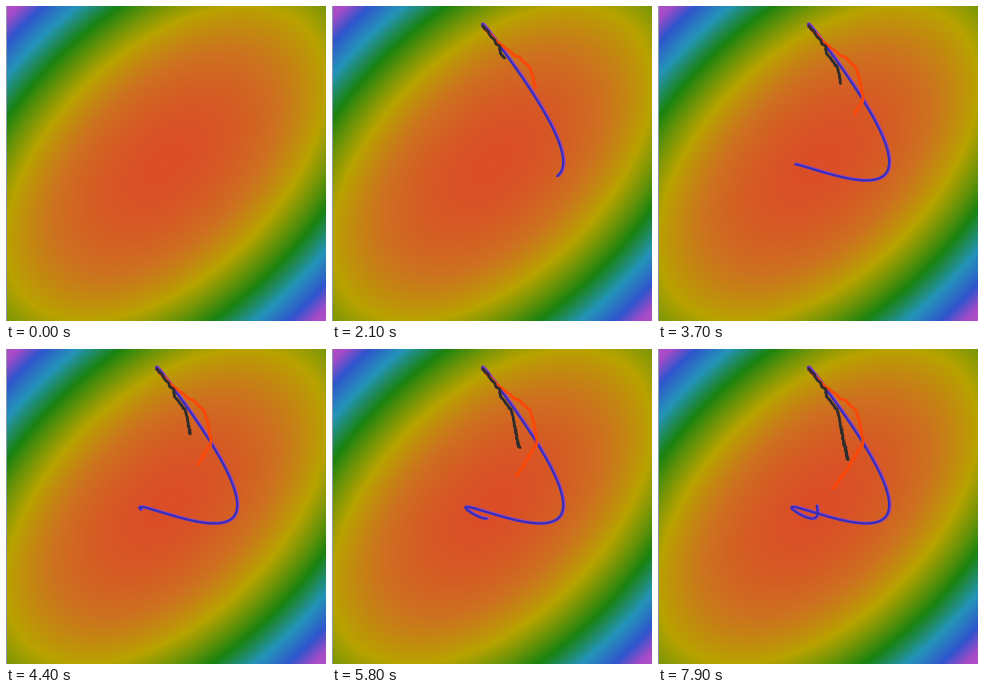
Write a matplotlib script that moves like this. It is 320 by 315 pixels and loops after 8000 ms.

```python
import numpy as np
import matplotlib.pyplot as plt
from matplotlib.animation import FuncAnimation
from matplotlib.colors import LinearSegmentedColormap

W, H, DPI = 320, 315, 100
FRAMES, STEP, SUB = 80, 100, 4
CX, CY = 160, 157

# Loss levels and their colours
STOPS = [
    (0.00, (219, 78, 40)), (0.35, (206, 112, 32)), (0.75, (184, 163, 0)),
    (1.36, (26, 131, 16)), (1.85, (36, 148, 185)), (2.35, (48, 85, 205)),
    (2.75, (165, 75, 200)), (3.00, (178, 80, 198)),
]

times = np.arange((FRAMES - 1) * SUB + 1) / SUB


def rgb(*c):
    return tuple(v / 255 for v in c)


def swing(size, phase, fade, power):
    """Oscillation whose size dies away around time `fade`."""
    return size * np.cos(np.pi * phase) / (1 + (times / fade) ** power)


def momentum():
    """Damped swings along the short (u) and long (v) axis of the bowl."""
    t = times
    slow_start = 0.2 * np.exp(-t / 5)
    u = -swing(149, -0.262 + 0.0585 * t - 0.000125 * t ** 2 + slow_start, 22.5, 2.6)
    v = swing(129.5, 0.5 + (t - 29.5) / 52, 33.5, 3.3)
    return CX + (u + v) / 2, CY + (u - v) / 2


def wander(points, seed):
    """Path through a few (time, x, y) points with a slight noisy wobble."""
    k, x, y = np.array(points, float).T
    noise = np.random.default_rng(seed).normal(0, 0.45, (2, FRAMES))
    noise[:, 0] = 0
    wobble = [np.interp(times, np.arange(FRAMES), n) for n in noise]
    return np.interp(times, k, x) + wobble[0], np.interp(times, k, y) + wobble[1]


fig = plt.figure(figsize=(W / DPI, H / DPI), dpi=DPI)
ax = fig.add_axes([0, 0, 1, 1])
ax.axis("off")

# Quadratic bowl x^2 + xy + y^2
gx, gy = np.meshgrid((np.arange(W) + 0.5) / W * 2 - 1, (np.arange(H) + 0.5) / H * 2 - 1)
cmap = LinearSegmentedColormap.from_list("bowl", [(p / 3, rgb(*c)) for p, c in STOPS], N=1024)
bowl = cmap((gx ** 2 + gx * gy + gy ** 2) / 3)
bowl[:, 0, :3] = rgb(140, 152, 165)
ax.imshow(bowl, extent=(0, W, H, 0), interpolation="nearest", aspect="auto")
ax.set_xlim(0, W)
ax.set_ylim(H, 0)

mx, my = momentum()
adaptive = wander([(0, 151, 20), (4, 167, 37), (12, 198, 61), (14, 201, 70),
                   (28, 205, 93), (37, 197, 108), (51, 188, 122), (79, 175, 140)], 3)
plain = wander([(0, 151, 20), (14, 168, 42), (18, 169, 48), (28, 180, 62),
                (37, 183, 77), (51, 186, 94), (79, 190, 111)], 5)

trails = []
for x, y, color, width in [
    (mx + 0.8, my - 0.2, rgb(150, 72, 195), 3.3),
    (mx, my, rgb(58, 45, 182), 2.3),
    (*adaptive, rgb(250, 72, 8), 2.9),
    (*plain, rgb(48, 44, 44), 2.8),
]:
    line, = ax.plot([], [], color=color, lw=width * 72 / DPI,
                    solid_capstyle="round", solid_joinstyle="round")
    trails.append((line, x, y))


def draw(frame):
    n = frame * SUB + 1 if frame else 0
    for line, x, y in trails:
        line.set_data(x[:n], y[:n])
    return [line for line, _, _ in trails]


anim = FuncAnimation(fig, draw, frames=FRAMES, interval=STEP, repeat=True, repeat_delay=0)
plt.show()
```
